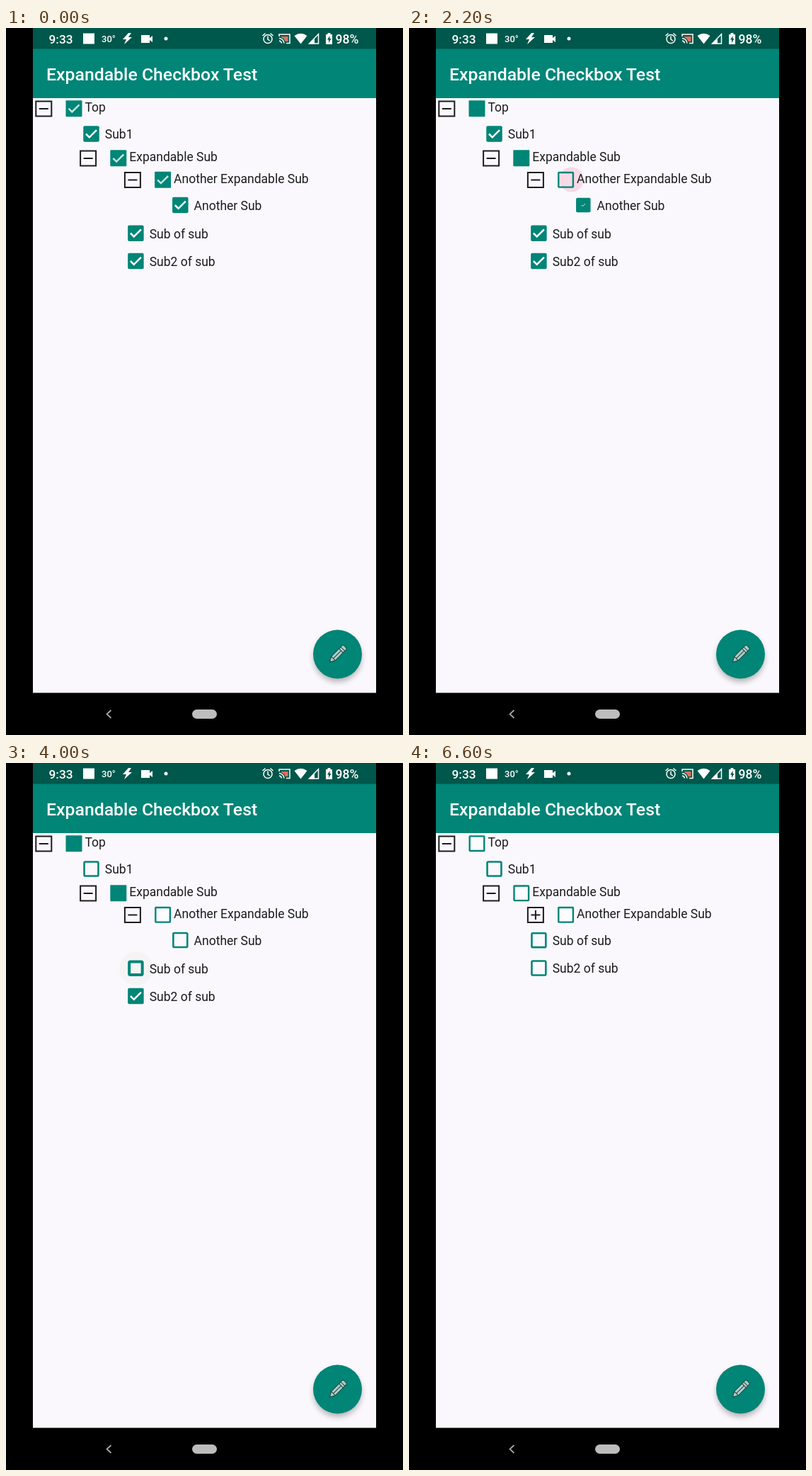
Animation of 561 by 998 pixels, one loop 8000 ms. Source, as an HTML page:

```html
<!DOCTYPE html>
<html lang="en">
<head>
<meta charset="utf-8">
<title>Expandable Checkbox Test</title>
<style>
html, body { margin: 0; height: 100%; overflow: hidden; background: #000; }
svg { display: block; width: 561px; height: 998px; font: 17.5px Roboto, sans-serif; }
.bar { fill: #fff; font-weight: 500; }
.fine { fill: none; stroke: #fff; stroke-width: 1.5; }
</style>
</head>
<body>
<svg viewBox="0 0 561 998">
  <defs>
    <filter id="soft" x="-30%" y="-30%" width="160%" height="160%"><feGaussianBlur stdDeviation="4"/></filter>
  </defs>
  <rect width="561" height="998"/>
  <rect x="38" width="485" height="938.5" fill="#faf8fc"/>
  <rect x="38" y="29" width="485" height="70" fill="#008577"/>
  <rect x="38" width="485" height="29.5" fill="#00574b"/>
  <text class="bar" x="57" y="74" font-size="24.8">Expandable Checkbox Test</text>

  <g class="bar">
    <text x="60.5" y="21.5" font-size="17.3">9:33</text>
    <rect x="109" y="7.5" width="16" height="15"/>
    <text x="135" y="20" font-size="13">30°</text>
    <path d="M173 7l-8 9h5l-3 7 11-10h-5l4-6z"/>
    <path d="M191 10h12v4l4-3v9l-4-3v4h-12z"/>
    <circle cx="226" cy="15" r="2.5"/>
    <g class="fine">
      <circle cx="370" cy="15.5" r="6"/>
      <path d="M370 11.5v4.5l3 2M362.5 11l4-3.5M377.5 11l-4-3.5"/>
      <path d="M386 12V9h15v12.500h-5M386 14.500q6 .5 7 7M386 18q3 .5 3.500 3.500"/>
    </g>
    <path d="M389 12h9.500v7h-4q-1-4-5.500-6z" fill="#e0705c"/>
    <path d="M407.500 11q9-6.500 18 0L416.500 22.500z"/>
    <path d="M428.500 22l13-13.500V22z" class="fine"/>
    <path d="M428 22.500l8-8v8z"/>
    <path d="M452 9h2.500V7h4v2h2.500v14h-9z"/>
    <path d="M457.500 11l-3.500 5.500h2V21l3.500-6h-2z" fill="#00574b"/>
    <text x="465.500" y="21.500">98%</text>
  </g>

  <g id="list"></g>

  <circle cx="468.500" cy="889" r="33.500" opacity=".3" filter="url(#soft)"/>
  <circle cx="468.500" cy="884" r="34.500" fill="#008577"/>
  <g transform="translate(468.500 884) rotate(-45)" fill="#a9cfca" stroke="#28433f" stroke-width="1">
    <path d="M-15.500 0l7-4H13q2 0 2 2v4q0 2-2 2H-8.500z"/>
    <path d="M-8.500-4v8M7-4v8M10.500-4v8M-8 0H7" fill="none"/>
  </g>
  <path d="M148.500 963l-6 5.500 6 5.500" fill="none" stroke="#aaa" stroke-width="1.700"/>
  <rect x="263" y="962" width="35" height="13" rx="6.500" fill="#bdbdbd"/>
</svg>
<script>
const LOOP = 8000, STEP = 200;
const TEAL = '#008577';
const list = document.getElementById('list');

// Leaves run through their uncheck animation from the time in `off`.
const leaves = [
  { label: 'Sub1', x: 120.5, y: 149.5, off: 3000 },
  { label: 'Another Sub', x: 246.3, y: 250, off: 2200 },
  { label: 'Sub of sub', x: 183.4, y: 289.7, off: 3800 },
  { label: 'Sub2 of sub', x: 183.4, y: 329, off: 4200 }
];
// Groups are checked, then solid from `some`, then empty from `off`.
const groups = [
  { label: 'Top', x: 96, y: 113.7, some: 2200, off: 4200 },
  { label: 'Expandable Sub', x: 158.8, y: 183.8, some: 2200, off: 4200 },
  { label: 'Another Expandable Sub', x: 221.6, y: 214.3, some: 2200, off: 2200 }
];
// Touch time, touch point, and the centre the ripple settles on.
const touches = [
  [2200, 229.5, 214, 222, 214],
  [3000, 127, 149, 121, 149],
  [3800, 187, 291, 184, 290],
  [4200, 187, 330, 184, 329.5]
];

const clamp = v => Math.max(0, Math.min(1, v));
const fade = t => (1 + Math.cos(Math.PI * clamp((t - 5900) / 300))) / 2;
const slide = t => 39.5 * (1 - (1 - clamp((t - 6200) / 300)) ** 2);

const at = (x, y, body, opacity = 1) =>
  `<g transform="translate(${x} ${y})" opacity="${opacity}">${body}</g>`;
const text = (x, y, s) => `<text x="${x}" y="${y}" fill="#1c1c1e">${s}</text>`;
const solid = (size, r) =>
  `<rect x="${-size / 2}" y="${-size / 2}" width="${size}" height="${size}" rx="${r}" fill="${TEAL}"/>`;
const hollow = (size, line, r, fill = 'none') => {
  const s = size - line;
  return `<rect x="${-s / 2}" y="${-s / 2}" width="${s}" height="${s}" rx="${r}" fill="${fill}" stroke="${TEAL}" stroke-width="${line}"/>`;
};
const tick = (scale, color) =>
  `<path d="M-7.500 0L-2.700 4.800L7.500-5.300" transform="scale(${scale})" fill="none" stroke="${color}" stroke-width="2.500"/>`;

function leaf({ label, x, y, off }, t, i) {
  const age = t - off;
  const box = age < 0 ? solid(22.5, 2) + tick(1, '#fff')
    : age < 200 ? solid(20.5, 2) + tick(.35, '#fff')
    : hollow(22.5, age < 400 ? 4 : 2.6, 1.5);
  const dy = i > 1 ? slide(t) : 0;
  return at(x, y - dy, box + text(19.3, 6.8, label), i === 1 ? fade(t) : 1);
}

function group({ label, x, y, some, off }, t, i) {
  const touched = i === 2 && t === some;
  const box = t < some ? solid(23, 1) + tick(1, '#c4e4df')
    : t < off ? solid(23, 1)
    : hollow(23, 2.4, .5, touched ? 'none' : '#fcfbfd');
  const plus = i === 2 && t >= 6000 ? 'M0-6.500V6.500' : '';
  const toggle = at(-42.7, .2,
    `<path d="M-11-10.500H11V10.500H-11zM-6.500 0H6.500${plus}" fill="none" stroke="#1c1c1e" stroke-width="2"/>`);
  return at(x, y, toggle + box + text(15.5, 4.5, label));
}

function ripple([start, x, y, restX, restY], t) {
  if (t === start) return `<circle cx="${x}" cy="${y}" r="17.500" fill="#f7dae6"/>`;
  if (t === start + STEP) return `<circle cx="${restX}" cy="${restY}" r="24" fill="#f5f4f5"/>`;
  return '';
}

let shown = -1;
function frame(now) {
  const t = Math.floor(now % LOOP / STEP) * STEP;
  if (t !== shown) {
    shown = t;
    list.innerHTML = [[touches, ripple], [groups, group], [leaves, leaf]]
      .map(([items, draw]) => items.map((item, i) => draw(item, t, i)).join('')).join('');
  }
  requestAnimationFrame(frame);
}
frame(0);
</script>
</body>
</html>
```
